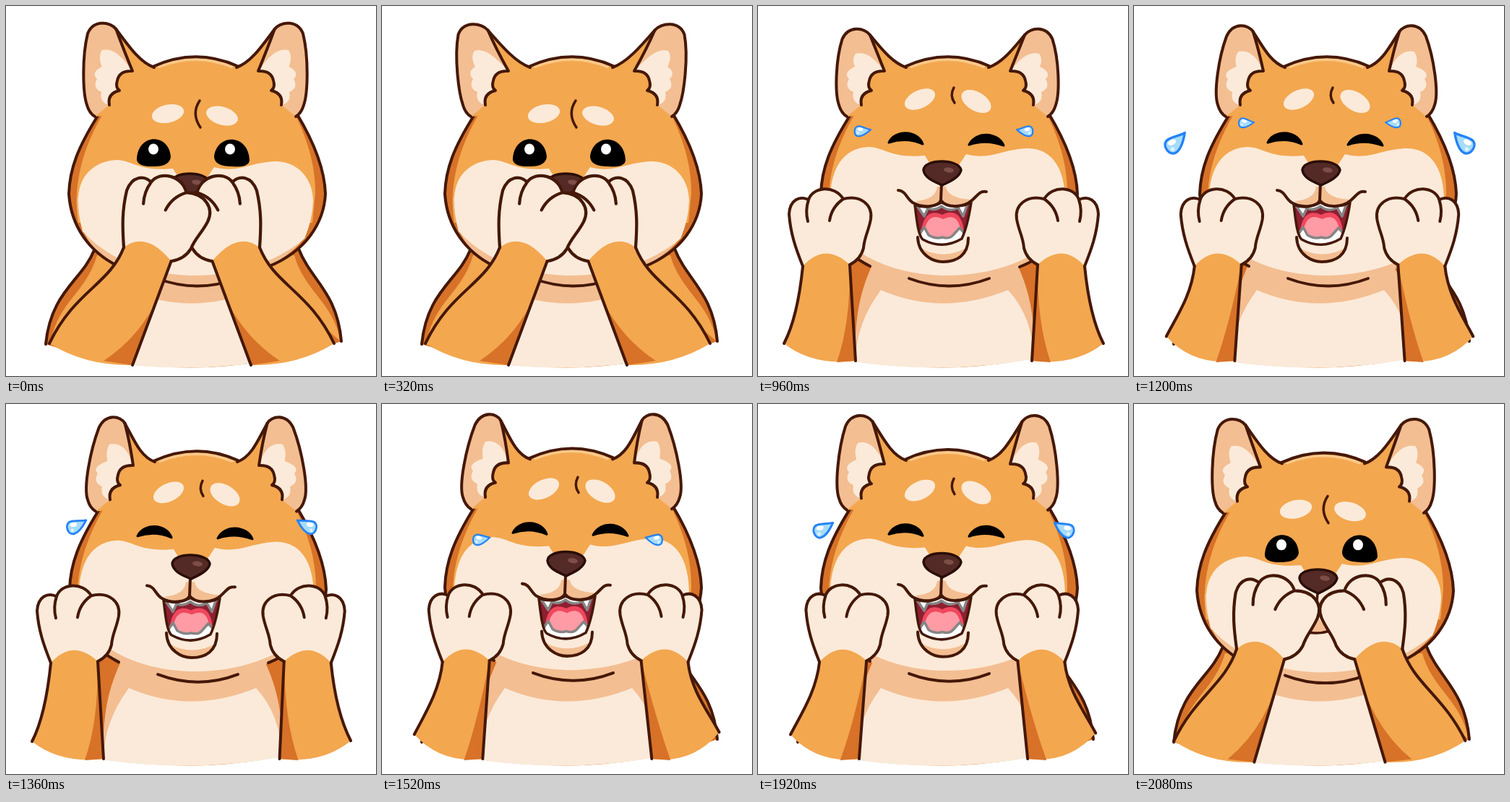
An HTML page with a canvas that plays this animation: 512x512 px, repeating every 2.16 s.

```html
<!DOCTYPE html>
<html lang="en">
<head>
<meta charset="utf-8">
<title>Laughing dog</title>
<style>
html, body { margin: 0; height: 100%; overflow: hidden; background: #fff; }
canvas { display: block; width: 100vw; height: 100vh; }
</style>
</head>
<body>
<canvas width="512" height="512"></canvas>
<script>
const g = document.querySelector('canvas').getContext('2d');
const LOOP = 2160, STEP = 80;
const ORANGE = '#f3a74f', DARK = '#d77228', PEACH = '#f3be92', CREAM = '#fbead9',
      LINE = '#451808', GRAY = '#858585';

const mix = (a, b, k) => a + (b - a) * k;
const clamp = v => Math.min(1, Math.max(0, v));
const wave = (t, peak) => Math.cos((t - peak) / LOOP * 2 * Math.PI);
const bump = (t, peak, half) => Math.cos(clamp(Math.abs(t - peak) / half) * Math.PI / 2) ** 2;
function ramp(t, from, to) {
  const p = clamp((t - from) / (to - from));
  return p * p * (3 - 2 * p);
}

// The head rises and falls once between neighbouring beats.
const beats = [0, 320, 640, 960, 1200, LOOP];
function bob(t) {
  const i = beats.findIndex(b => b > t);
  return -10 * Math.sin((t - beats[i - 1]) / (beats[i] - beats[i - 1]) * Math.PI);
}

function draw(d, fill, stroke, width = 4) {
  const p = new Path2D(d);
  if (fill) { g.fillStyle = fill; g.fill(p); }
  if (stroke) { g.strokeStyle = stroke; g.lineWidth = width; g.stroke(p); }
}
const line = (d, width) => draw(d, null, LINE, width);

function oval(x, y, rx, ry, turn, fill) {
  g.beginPath();
  g.ellipse(x, y, rx, ry, turn * Math.PI / 180, 0, 7);
  g.fillStyle = fill;
  g.fill();
}

function group(fn) { g.save(); fn(); g.restore(); }
function shifted(y, fn) { group(() => { g.translate(0, y); fn(); }); }
function mirrored(width, fn) {
  group(() => { g.translate(width, 0); g.scale(-1, 1); fn(); });
}

function torso(open) {
  draw('M122,338C105,380 62,395 55,468Q260,535 464,464C458,395 422,380 405,336Z', DARK);
  if (open < .5) {
    const sleeve = () => draw('M126,345L170,345L120,415L62,464C72,410 112,395 126,345Z', ORANGE);
    sleeve();
    mirrored(525, sleeve);
  }
  draw('M162,350C140,395 134,430 134,492Q258,510 382,488C384,440 378,395 355,350Z', PEACH);
  draw('M170,393Q255,430 346,393Q380,430 382,488Q258,511 135,492Q135,440 170,393Z', CREAM);
  line('M122,338C105,380 62,395 55,468M405,336C422,380 458,395 464,464');
}

function ear(lean, drop) {
  const x = (v, k) => v + lean * k, y = (v, k = 1) => v + drop * k;
  const corner = `${x(150, .65)},${y(32)}`;
  const side = `C${x(142, .75)},${y(22)} ${x(118, .95)},${y(18)} ${x(110, .85)},${y(38)}` +
    `C${x(103, .6)},${y(70, .5)} 106,120 112,137Q115,148 123,153`;
  const back = `M205,85C185,78 ${x(168, .4)},${y(55, .5)} ${corner}`;
  const fold = `M${corner}Q${x(160, .5)},${y(58, .5)} 175,90`;
  const tuft = 'Q157,89 154,103Q151,113 157,117Q140,121 143,137';
  draw(`${back}${side}L160,150Z`, ORANGE);
  draw(`M${corner}${side}L143,137Q140,121 157,117Q151,113 154,103Q157,89 175,90Q${x(160, .5)},${y(58, .5)} ${corner}Z`, PEACH);
  const cx = x(131, .55), cy = y(61, .6);
  draw(`M${cx},${cy}C${cx + 14},${cy - 3} ${cx + 25},${cy + 5} 175,90${tuft}` +
    `Q129,134 132,119Q119,113 126,101Q117,92 ${x(131, .4)},84Q${cx - 6},${cy + 8} ${cx},${cy}Z`, CREAM);
  line(back + side);
  line(fold + tuft);
}

function headShape(lift) {
  draw('M205,83Q262,58 318,83L403,150C430,195 441,230 442,260C440,300 420,335 385,348' +
    'L320,375L209,375L155,358C115,338 90,305 87,260C88,225 100,195 127,152Z', DARK);
  draw('M205,83Q262,58 318,83L400,150C420,190 428,225 428,260L424,300L100,300C92,250 105,200 132,153Z', ORANGE);
  draw('M98,265C100,310 115,338 155,361L207,379Q265,400 322,379Q388,354 412,322L425,265Z', PEACH);
  const y = v => v + lift;
  draw(`M100,265C102,${y(228)} 130,${y(213)} 155,${y(213)}C177,${y(215)} 185,${y(229)} 231,${y(225)}` +
    `L239,${y(238)}L278,${y(238)}L288,${y(223)}C322,${y(232)} 340,${y(215)} 375,${y(215)}` +
    `C405,${y(216)} 425,${y(240)} 425,270C424,290 420,305 413,322Q350,373 258,373Q162,371 106,312Q100,290 100,265Z`, CREAM);
  draw('M212,84Q262,64 312,84', null, '#fbc888');
  line('M203,84Q262,57 320,83M127,152C100,195 88,225 87,260C90,305 115,340 155,360' +
    'M209,377Q265,398 320,377M403,150C430,195 441,230 442,260C440,300 415,340 362,361');
}

function nose() {
  draw('M229,227C230,211 278,211 281,227C279,238 262,244 255,248C248,244 231,240 229,227Z', '#542a26', '#2b0d08', 3.5);
  oval(264, 227, 7, 3.5, 8, '#7d4d47');
}

function coveringFace() {
  oval(224, 149, 22.5, 12.5, -12, CREAM);
  oval(299, 152, 22.5, 12.5, 16, CREAM);
  line('M268,131Q256,149 269,168', 3.5);
  draw('M181,213C182,175 226,176 228,209Q226,222 205,222Q183,223 181,213Z', '#000');
  draw('M288,209C291,176 336,176 337,214Q335,224 313,222Q289,222 288,209Z', '#000');
  oval(204, 198, 7, 7.5, 0, '#fff');
  oval(310, 198, 7, 7.5, 0, '#fff');
  draw('M254,298L236,318Q254,322 270,317Z', PEACH);
  line('M254,265L251,300M236,318Q254,322 270,317', 3.5);
  shifted(17, nose);
}

function laughingEyes() {
  oval(224, 129, 22.5, 12.5, -25, CREAM);
  oval(302, 132, 22.5, 13, 30, CREAM);
  line('M271,113Q265,124 272,134', 3.5);
  draw('M181,189C189,171 221,171 228,191Q205,181 181,189Z', '#000', '#000', 3);
  draw('M292,192C301,173 332,174 340,193Q315,184 292,192Z', '#000', '#000', 3);
}

function mouth() {
  const lip = 'M221,320C222,345 243,354 256,354C275,354 291,345 291,321';
  draw(`${lip}Z`, CREAM);
  draw('M225,335Q256,352 288,335C280,350 268,354 256,354C243,354 232,348 225,335Z', PEACH);
  const shape = 'M217,275C220,300 222,318 228,323Q255,338 282,322C290,305 293,285 295,272Q275,282 254,272Q235,282 217,275Z';
  draw(shape, '#8e1f31');
  group(() => {
    g.clip(new Path2D(shape));
    draw('M225,330C224,280 245,284 255,289C270,281 288,286 285,330Z', '#f0485e');
    draw('M229,330C229,286 246,290 256,295C270,288 283,292 281,330Z', '#ff9ba5');
    draw('M214,272L222,279L230,291L235,280Q245,284 254,277Q265,286 277,279L284,291L289,276L298,268L254,262Z', '#fff', GRAY, 3.5);
    draw('M222,318L230,306L236,317Q246,323 255,320Q265,323 270,317L279,307L287,316L282,336L226,336Z', '#fff', GRAY, 3.5);
  });
  line(shape, 3.5);
  draw('M218,270Q246,268 248,250L260,250Q262,266 296,268C282,280 264,280 253,269C242,281 228,277 218,270Z', PEACH);
  line('M194,255C205,256 205,266 214,272C230,281 250,277 253,269C262,281 286,278 296,269C306,260 307,256 316,257M254,244L253,269');
  line(lip);
}

// One hand, measured from the outer side of its wrist.
const HAND = 'M0,0C-10,-25 -17,-45 -19,-72C-18,-92 -4,-98 8,-92C14,-110 44,-113 56,-93' +
  'C80,-99 97,-85 94,-65C91,-48 85,-40 84,-25C81,-13 73,-6 65,-2';
const CREASES = 'M8,-92Q3,-77 7,-62M56,-93Q40,-82 37,-63';

function arm(open, inward, lift) {
  const m = (a, b) => mix(a, b, open);
  const x = m(163, 62) + inward, y = m(334, 360) + lift;
  const turn = m(.31, 0), size = m(1.06, 1);
  const innerX = x + 65 * size * Math.cos(turn), innerY = y + 65 * size * Math.sin(turn) - 2;
  const elbowX = m(60, 36) + inward * .4, elbowY = 467 - inward * .45;
  const footX = m(175, 135) + inward * .2, footY = m(497, 491);
  const inHand = fn => group(() => {
    g.translate(x, y);
    g.rotate(turn);
    g.scale(size, size);
    fn();
  });
  const outer = `M${x},${y}C${x + m(-20, -4)},${y + m(52, 40)} ${elbowX + m(35, 14)},${elbowY - m(73, 27)} ${elbowX},${elbowY}`;
  const inner = `${innerX},${innerY}L${footX},${footY}`;

  inHand(() => draw(`${HAND}Z`, CREAM));
  draw(`${outer}Q${m(110, 75) + inward * .3},498 ${footX},${footY}L${innerX},${innerY}` +
    `Q${(x + innerX) / 2 - 2},${(y + innerY) / 2 - 33} ${x},${y}Z`, ORANGE);
  draw(`M${inner}L${footX - m(40, 26)},${footY + m(-6, 2)}Q${footX + m(30, -7)},${footY - 52} ${innerX},${innerY}Z`, DARK);
  line(`${outer}M${inner}`);
  inHand(() => line(HAND + CREASES));
}

function tear(i, t) {
  const p = (t - 880 - 270 * i) / 320;
  if (p < 0 || p > 1) return;
  group(() => {
    g.translate(172 - 115 * p, 172 + 14 * Math.sin(4 * i) + 18 * p * p);
    g.rotate(mix(.2, -.7, p));
    const size = mix(.7, 1.3, p);
    g.scale(size, size);
    draw('M15,-2C6,-4 0,-9 -6,-8C-13,-6 -13,7 -6,8C0,9 8,4 15,-2Z', '#a6dcf8', '#2582f5', 2.6);
    oval(-2, -3, 4.5, 2.8, 15, '#fff');
    oval(-6, 3, 2, 2, 0, '#dff4ff');
  });
}

function frame(now) {
  const t = Math.floor(now % LOOP / STEP) * STEP;
  const rise = bob(t), extra = rise * .4;
  const open = ramp(t, 600, 860) - ramp(t, 1900, LOOP);
  const squeeze = open * 24 * Math.sin((t - 960) / 400 * Math.PI) ** 2;
  const lean = 8 + 14 * wave(t, 1510), drop = 9 * Math.max(0, wave(t, 800));
  const laughing = open > .3;

  g.fillStyle = '#fff';
  g.fillRect(0, 0, 512, 512);
  g.lineCap = g.lineJoin = 'round';
  torso(open);
  group(() => {
    // The jaw follows the bob less than the crown.
    g.transform(1, 0, 0, 1 - .0015 * rise, 4 * bump(t, 1200, 240), rise * 1.12);
    headShape(laughing ? extra - 18 : 0);
    ear(lean, drop);
    mirrored(524, () => ear(lean, drop));
    if (laughing) {
      shifted(extra, laughingEyes);
      mouth();
      shifted(extra, nose);
    } else {
      shifted(extra, coveringFace);
    }
  });
  mirrored(514, () => arm(open, squeeze + 9 * bump(t, 1680, 480), rise * .35));
  arm(open, squeeze, rise * .35);
  for (let i = 0; i < 4; i++) {
    tear(i, t);
    mirrored(514, () => tear(i, t));
  }
  requestAnimationFrame(frame);
}
requestAnimationFrame(frame);
</script>
</body>
</html>
```
